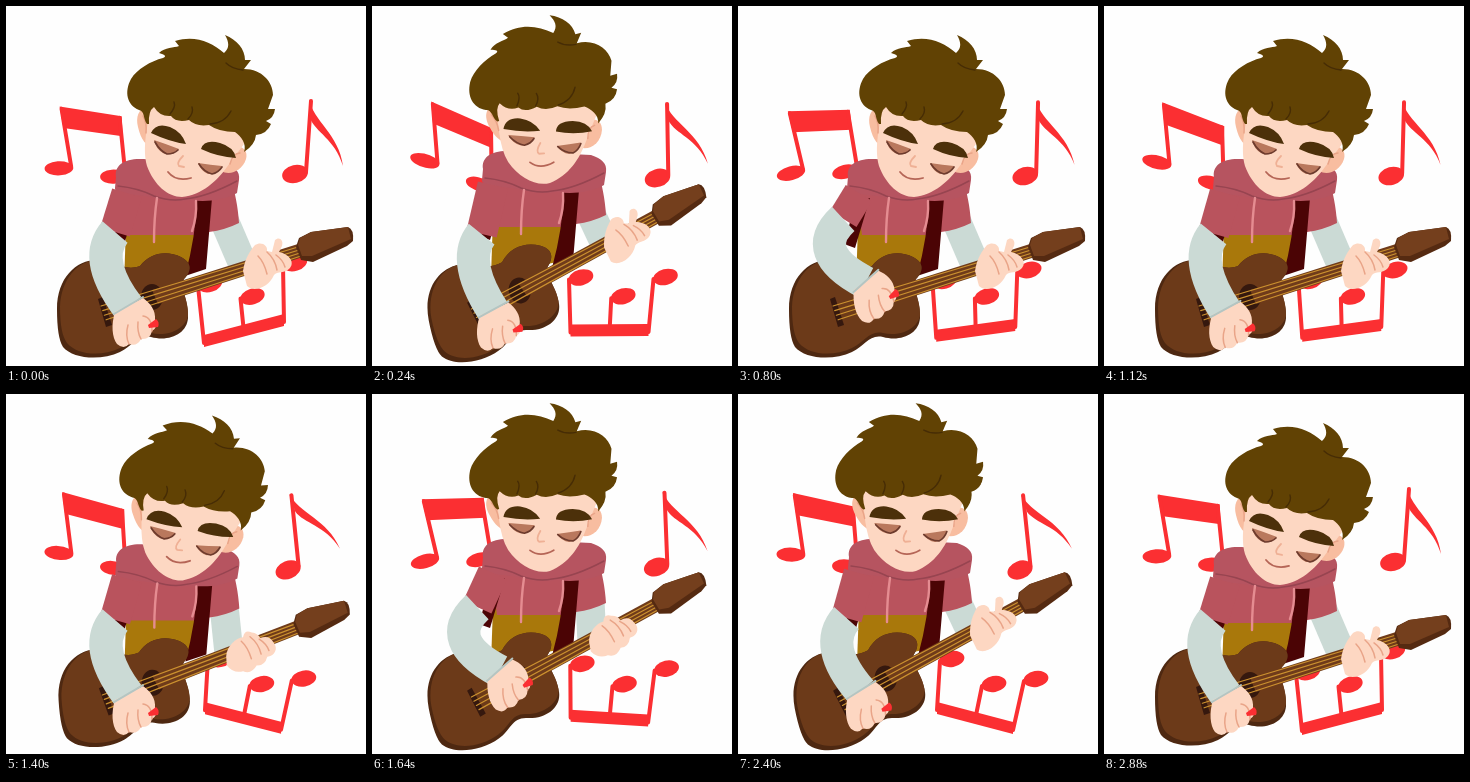
An HTML page for the animation above (2920 ms loop, 360 px wide and 360 px high).

```html
<!DOCTYPE html>
<html lang="en">
<head>
<meta charset="utf-8">
<title>Guitar player</title>
<style>
  html, body { margin: 0; width: 100%; height: 100%; overflow: hidden; background: #fefefe; }
  svg { display: block; width: 100%; height: 100%; }
  .line { fill: none; stroke-linecap: round; stroke-linejoin: round; }
  .sleeve { fill: none; stroke: #cbdad5; }
  .hair { fill: #614204; }
  .skin { fill: #fdd7c2; }
  .ear { fill: #f8bda0; }
  .fold { stroke: #e9a488; stroke-width: 1.5; }
  .pink { fill: #b9535d; }
  .red { fill: #fb2f32; }
  .stem { stroke: #fb2f32; stroke-width: 4; }
  .strap { fill: #4b0405; }
  .wood { fill: #6c3a19; }
</style>
</head>
<body>
<svg viewBox="0 0 360 360">
  <g id="leftNote">
    <path class="red" d="M50 105 L112 104 L114 124 L55 126Z"/>
    <path class="line stem" d="M52 107 L65 163 M110 106 L119 161"/>
    <ellipse class="red" cx="53" cy="167" rx="14.5" ry="7" transform="rotate(-14 53 167)"/>
    <ellipse class="red" cx="107" cy="166" rx="13" ry="7" transform="rotate(-14 107 166)"/>
  </g>
  <g id="rightNote">
    <ellipse class="red" cx="289" cy="168" rx="13" ry="9" transform="rotate(-12 289 168)"/>
    <path class="line stem" d="M300 166 L305 95"/>
    <path id="flag" class="red" d="M303 93 C307 115 333 128 337 160 C329 133 309 126 304 112Z"/>
  </g>
  <g id="lowNote">
    <path id="stems" class="line stem"/>
    <path id="beam" class="red"/>
  </g>

  <path id="fretSleeve" class="sleeve" stroke-width="29"/>
  <g id="torso">
    <path d="M120 220 H192 L184 264 L118 278Z" fill="#a9780b"/>
    <path class="pink" d="M116 172 L224 172 C229 184 232 202 233 217 Q219 224 203 226 L190 229 H124Z"/>
    <path class="strap" d="M132 192 L117 198 L106 238 L117 242Z"/>
    <path class="strap" d="M191 192 L206 192 L200 263 L179 270 Q190 230 191 192Z"/>
    <path d="M110 171 C108 159 119 152 137 153 L218 157 C229 161 234 165 233 174 L231 187
             C217 195 198 196 184 194 C168 197 152 193 144 191 C130 188 108 189 109 182Z" fill="#b65460"/>
    <path class="line" d="M112 180 Q132 182 148 190 Q165 196 179 193 Q201 191 231 175" stroke="#974450" stroke-width="1.5"/>
    <path class="line" d="M151 192 Q148 212 148 236 M190 195 Q191 211 186 225" stroke="#e58c91" stroke-width="2.4"/>
  </g>

  <g id="head">
    <path class="ear" d="M148 104 C134 98 129 109 132 121 C135 134 140 140 147 141Z"/>
    <path class="ear" d="M220 146 C231 136 243 141 240 153 C236 165 224 170 215 165Z"/>
    <path class="skin" d="M147 92 C141 120 136 142 141 160 C148 179 162 191 176 191
                          C196 189 211 175 221 161 L238 138 L246 110Z"/>
    <path class="line fold" d="M234 147 Q227 147 224 158 M137 110 Q141 117 140 127"/>
    <path class="hair" d="M141 118 C137 113 139 105 133 104 C121 99 118 86 125 73 C131 63 145 55 157 52
      C162 50 157 48 153 47 C159 41 168 42 173 40 L169 35 C189 29 205 36 218 47
      C224 42 223 36 219 29 C231 34 239 43 239 54 L245 54 L238 63
      C256 63 267 76 267 89 L262 103 L269 103 Q268 112 260 115
      L265 118 Q261 128 250 129 Q249 139 238 146 C241 138 235 130 229 126
      Q213 126 203 119 Q190 121 183 114 Q170 117 165 110 Q154 111 148 101 Q142 105 143 118Z"/>
    <path class="line" d="M164 108 Q170 101 168 96 M182 113 Q188 107 186 101 M204 118 Q219 117 225 105 M237 64 Q226 63 220 57"
          stroke="#462c05" stroke-width="1.4"/>
    <path d="M145 127 Q150 116 164 121 Q176 126 180 138 Q164 136 145 127Z
             M195 143 Q198 133 214 137 Q228 141 230 152 Q212 151 195 143Z" fill="#4c300a"/>
    <path d="M148 134 Q160 138 173 143 Q166 151 157 147 Q150 143 148 134Z
             M192 157 Q205 159 216 160 Q211 169 202 168 Q195 165 192 157Z" fill="#b9785d"/>
    <path class="line" d="M149 136 Q154 145 161 148 Q168 148 172 144 M193 158 Q198 166 206 168 Q212 167 216 161"
          stroke="#6d3b2d" stroke-width="1.7"/>
    <path class="line" d="M177 150 Q170 157 173 160 L178 161" stroke="#efb095" stroke-width="1.8"/>
    <path class="line" d="M162 166 Q170 176 185 172" stroke="#b56556" stroke-width="1.8"/>
  </g>

  <g id="guitar">
    <path d="M51 303 C51 272 70 254 91 254 C107 254 118 266 134 260 C144 247 160 244 175 251
             C187 257 185 266 178 273 C173 281 183 294 182 312 C181 328 163 336 145 331
             C131 328 127 340 114 346 C95 355 67 353 57 341 Q51 332 51 303Z" fill="#4e2811"/>
    <path class="wood" d="M54 301 C55 273 72 254 92 254 C107 254 118 266 134 260 C144 247 160 244 175 251
             C187 257 185 266 178 273 C173 281 183 294 182 309 C180 323 162 331 145 327
             C131 324 127 336 114 342 C95 351 71 349 61 337 Q54 328 54 301Z"/>
    <ellipse cx="146" cy="291" rx="11" ry="13" fill="#35180e"/>
    <path d="M146 284 L292 238 L297 251 L152 298Z" fill="#6f3b1a"/>
    <path d="M92 293 L97 291 L106 319 L100 321Z" fill="#35180e"/>
    <path id="strings" class="line" stroke="#cc922f" stroke-width="1.2"/>
    <path d="M290 241 L293 232 L305 226 L342 221 Q348 223 347 235 L341 240 L307 256 L295 254Z" fill="#552a11"/>
    <path d="M292 239 L294 232 L305 226 L342 221 L345 233 L306 250 L296 250Z" fill="#743f1d"/>
    <g id="fretHand">
      <path id="open" class="skin" d="M237 265 C239 252 244 245 249 239 C255 235 262 239 261 245 L266 246 L269 234
          C273 230 278 234 276 240 L273 246 C283 248 289 256 284 262 C279 268 271 265 268 269
          C263 281 248 287 241 280Z"/>
      <path id="fist" class="skin" d="M236 264 C237 254 247 246 254 246 Q256 238 263 242 Q269 243 271 248
          Q280 245 284 253 C289 260 284 267 277 267 Q274 276 266 275 Q260 284 252 280 Q242 282 236 273Z"/>
      <path class="line fold" d="M252 250 Q258 256 261 268 M261 246 Q269 253 271 264 M270 249 Q277 254 279 261"/>
    </g>
  </g>

  <path id="upper" class="sleeve" style="stroke: #b9535d" stroke-width="31"/>
  <path id="lower" class="sleeve" stroke-width="33"/>
  <g id="hand">
    <path class="skin" d="M109 306 C105 319 106 331 111 338 Q118 344 123 338 Q131 341 135 333
      Q144 334 146 325 Q152 322 149 314 C150 304 144 297 137 292Z"/>
    <path class="line" d="M108 308 L137 291" stroke="#b4c5c2" stroke-width="2"/>
    <path class="line fold" d="M122 319 Q119 330 123 338 M132 316 Q131 326 135 333 M137 310 Q146 311 146 325"/>
    <path class="red" d="M142 319 L150 313 Q154 316 152 321 L143 322Z"/>
  </g>
</svg>

<script>
const LOOP = 2920, STEP = 40, BEAT = 960, TURN = 2 * Math.PI / BEAT;
const $ = id => document.getElementById(id);
const set = (id, name, value) => $(id).setAttribute(name, value);
const move = (id, value) => set(id, "transform", value);
const lerp = (a, b, k) => a + (b - a) * k;
const mix = (a, b, k) => a.map((v, i) => lerp(v, b[i], k));

function ease(t, from, to) {
  const k = Math.min(1, Math.max(0, (t - from) / (to - from)));
  return k * k * (3 - 2 * k);
}
// rises from a to b, stays at 1, falls from c to d
const pulse = (t, a, b, c, d) => ease(t, a, b) - ease(t, c, d);

const dots = [0, 1, 2].map(() => {
  const dot = document.createElementNS("http://www.w3.org/2000/svg", "ellipse");
  dot.setAttribute("class", "red");
  dot.setAttribute("rx", 12.5);
  dot.setAttribute("ry", 8);
  return $("lowNote").appendChild(dot);
});

set("strings", "d", [0, 1, 2, 3].map(i => `M${95 + i * 1.7} ${300 + i * 4.6} L${292 + i} ${241 + i * 3}`).join(""));

function drawNotes(beat) {
  const sway = (1 - Math.cos(beat * TURN)) / 2;
  const tilt = 11.5 + 13 * Math.cos((beat - 260) * TURN);
  move("leftNote", `translate(80 166) skewY(${tilt}) skewX(${-tilt * .35}) translate(-80 -166)`);
  move("rightNote", `translate(${-7 * sway} ${8 * sway}) rotate(${-10 * sway} 289 168)`);
  move("flag", `rotate(${-6 * sway} 303 93)`);

  // three stems stand on a beam that tips from side to side
  const left = mix([198, 341], [199, 320], sway), right = mix([278, 320], [275, 340], sway);
  let stems = "";
  dots.forEach((dot, i) => {
    const k = i / 2, [x, y] = mix(left, right, k);
    const topX = x + lerp(5 * k - 6, 3 + 8 * k, sway);
    const topY = y - (i === 1 ? 38 : lerp(61, 53, sway));
    stems += `M${x} ${y - 4} L${topX} ${topY}`;
    dot.setAttribute("transform", `translate(${topX + 12} ${topY - 2}) rotate(${-18 + 8 * sway})`);
  });
  set("stems", "d", stems);
  set("beam", "d", `M${left} L${right} v-12 L${left[0]} ${left[1] - 12}Z`);
}

function drawStrum(strum, lean) {
  const hem = mix([109, 226], [105, 212], strum);
  const elbow = mix([86, 253], [68, 246], strum);
  const wrist = mix([122, 301], [128, 275], strum);
  set("upper", "d", `M121 ${187 - 8 * lean} L${hem}`);
  set("lower", "d", `M${hem} Q${elbow} ${wrist}`);
  move("hand", `translate(${wrist[0] - 122} ${wrist[1] - 301}) rotate(${-12 * strum} 122 301)`);
}

function drawFretting(slide, lean) {
  const dx = -15 * slide, dy = 5 * slide, closed = slide > .5;
  move("fretHand", `translate(${dx} ${dy})`);
  set("open", "visibility", closed ? "hidden" : "visible");
  set("fist", "visibility", closed ? "visible" : "hidden");
  const neck = new DOMMatrix($("guitar").style.transform);
  const wrist = neck.transformPoint({ x: 239 + dx, y: 263 + dy });
  set("fretSleeve", "d", `M218 ${214 - 8 * lean} L${wrist.x} ${wrist.y}`);
}

function render(t) {
  const beat = t % BEAT;
  const lean = pulse(t, 0, 220, 290, 512) + pulse(t, 1260, 1630, 2540, 2885);
  const strum = pulse(beat, 400, 740, 770, 970) - .15 * Math.max(0, Math.sin(beat * TURN));
  const slide = pulse(t, 1120, 1280, 2160, 2320);

  move("torso", `translate(${lean} ${-8 * lean})`);
  move("head", `translate(${2 * lean} ${-12 * lean}) rotate(${-15 * lean} 168 190)`);
  $("guitar").style.transform =
    `translate(${110 + 6 * lean}px, 310px) rotate(${-11 * lean}deg) translate(-110px, -310px)`;

  drawNotes(beat);
  drawStrum(strum, lean);
  drawFretting(slide, lean);
}

const start = performance.now();
function tick() {
  const t = (performance.now() - start) % LOOP;
  render(Math.floor(t / STEP) * STEP);
  requestAnimationFrame(tick);
}
render(0);
requestAnimationFrame(tick);
</script>
</body>
</html>
```
